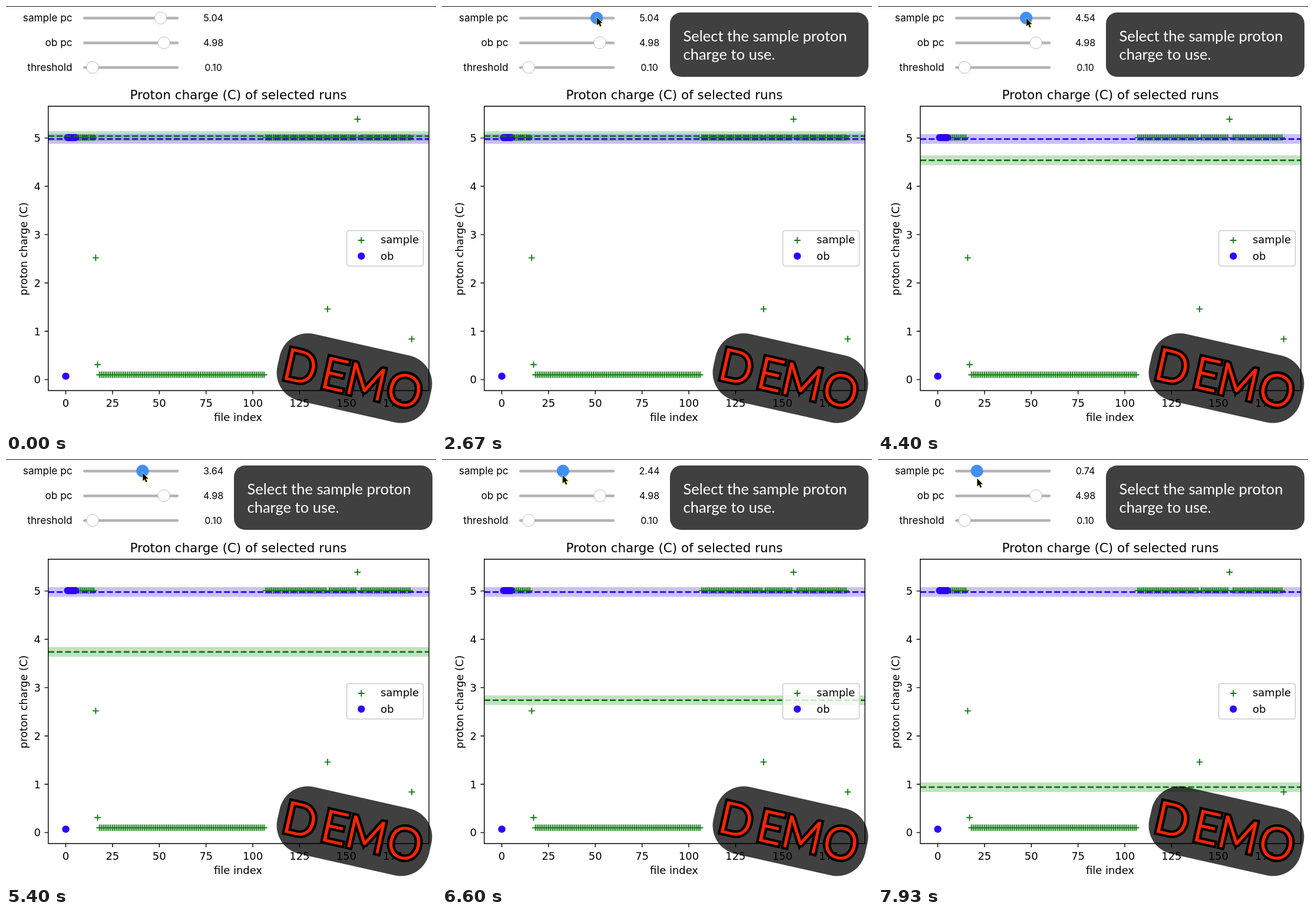
These frames come from a looping animation (730x720 px, 8000 ms). An HTML page:

```html
<!DOCTYPE html>
<html lang="en">
<head>
<meta charset="utf-8">
<title>Proton charge selection</title>
<style>
  html, body { margin: 0; width: 100%; height: 100%; overflow: hidden; background: #fff; }
  svg { display: block; }
  .ui { font: 16px Inter, "Liberation Sans", sans-serif; }
  .label { font-size: 17.2px; text-anchor: end; }
  .plot { font: 17.9px "DejaVu Sans", sans-serif; }
  .note { font: 25.5px Lato, sans-serif; fill: #fff; }
  .demo { font: 300 75px Lato, sans-serif; text-anchor: middle; }
  .mid { text-anchor: middle; }
  .end { text-anchor: end; }
  .plus { fill: none; stroke: #147a14; stroke-width: 1.9; }
  .dash { fill: none; stroke-width: 2.7; stroke-dasharray: 9.9 4.3; }
  .axis { fill: none; stroke: #000; stroke-width: 1.4; }
</style>
</head>
<body>
<svg width="730" height="720" viewBox="0 0 730 720">
  <rect width="730" height="1" fill="#111"/>
  <g id="sliders" class="ui"></g>

  <g class="plot">
    <rect id="obBand" x="72" width="646" height="16.4" fill="#2a00ff" opacity=".25"/>
    <rect id="band" x="72" width="646" height="16.4" fill="#008000" opacity=".24"/>
    <path id="samples" class="plus"/>
    <g id="obs" fill="#2f00ff"></g>
    <path id="line" class="dash" stroke="#0a760a"/>
    <path id="obLine" class="dash" stroke="#2a00f0"/>
    <path id="axes" class="axis"/>
    <g id="ticks"></g>
    <text class="mid" x="394.5" y="158" font-size="21.5">Proton charge (C) of selected runs</text>
    <text class="mid" x="394" y="703">file index</text>
    <text class="mid" transform="translate(35.5 411.5) rotate(-90)">proton charge (C)</text>
    <rect x="578.5" y="380.5" width="130" height="60" rx="4" fill="#fff" fill-opacity=".8" stroke="#ccc" stroke-width="1.6"/>
    <path class="plus" d="M597.8 397h10.8m-5.4-5.4v10.8"/>
    <circle cx="603.2" cy="423.7" r="6.2" fill="#2f00ff"/>
    <text x="636" y="402">sample</text>
    <text x="636" y="429.5">ob</text>
  </g>

  <g transform="translate(591.5 630.5) rotate(12.7)">
    <rect x="-132" y="-58" width="264" height="116" rx="49" fill-opacity=".75"/>
    <g class="demo" stroke="#000" stroke-width="10">
      <g id="letters">
        <text x="-94" y="27.5">D</text><text x="-34" y="27.5">E</text>
        <text x="21" y="27.5">M</text><text x="88" y="27.5">O</text>
      </g>
    </g>
    <use href="#letters" class="demo" fill="#ff2600" stroke="#ff2600" stroke-width="1.6"/>
  </g>

  <g id="note" class="note">
    <rect x="387" y="11" width="337" height="109" rx="19" fill="#404040"/>
    <text x="409.5" y="59.5">Select the sample proton</text>
    <text x="409.5" y="91">charge to use.</text>
  </g>

  <path id="cursor" d="M0 0V13l3-2.8 2.2 5 2.2-.9-2.2-5H9.2z" stroke="#e4ec5a" stroke-width="1.4" paint-order="stroke"/>
</svg>
<script>
const $ = id => document.getElementById(id);
const add = (parent, tag, attrs, text = '') => {
  const el = document.createElementNS('http://www.w3.org/2000/svg', tag);
  for (const k in attrs) el.setAttribute(k, attrs[k]);
  el.textContent = text;
  return parent.appendChild(el);
};
const px = i => 101.5 + 3.175 * i;
const py = v => 632.9 - 81.85 * v;
const knobX = v => 151.7 + 22 * v;

// Sliders
function slider(label, y, x, value) {
  const g = $('sliders');
  add(g, 'text', { class: 'label', x: 112.5, y: y + 6 }, label);
  add(g, 'rect', { x: 131, y: y - 2, width: 162, height: 4.5, rx: 2, fill: '#b3b3b3' });
  const knob = add(g, 'circle', { cx: x, cy: y, r: 10.2, fill: '#fff', stroke: '#bdbdbd' });
  const out = add(g, 'text', { class: 'mid', x: 352, y: y + 6 }, value);
  return { knob, out };
}
const main = slider('sample pc', 20.3, knobX(5.04), '5.04');
slider('ob pc', 62.3, 268, '4.98');
slider('threshold', 104, 147, '0.10');

// Axes
let axes = 'M71.7 169.7H718V651.5H71.7z';
for (let i = 0; i <= 175; i += 25) {
  axes += `M${px(i)} 651.5v6.3`;
  add($('ticks'), 'text', { class: 'mid', x: px(i), y: 679 }, i);
}
for (let v = 0; v <= 5; v++) {
  axes += `M71.7 ${py(v)}h-6.3`;
  add($('ticks'), 'text', { class: 'end', x: 59, y: py(v) + 6.5 }, v);
}
$('axes').setAttribute('d', axes);

// Data: two flat runs and a few outliers
const outliers = { 16: 2.52, 17: .31, 140: 1.46, 156: 5.39, 157: .05, 185: .84 };
let marks = '';
for (let i = 1; i <= 185; i++) {
  const v = outliers[i] ?? (i > 17 && i < 107 ? .1 : 5.01);
  marks += `M${px(i) - 5.4} ${py(v)}h10.8m-5.4-5.4v10.8`;
}
$('samples').setAttribute('d', marks);
for (let i = 0; i < 6; i++)
  add($('obs'), 'circle', { cx: px(i), cy: py(i ? 5.01 : .07), r: 6.2 });

function setBand(band, line, v) {
  band.setAttribute('y', py(v) - 8.2);
  line.setAttribute('d', `M72 ${py(v)}H718`);
}
setBand($('obBand'), $('obLine'), 4.98);

// Motion
const approach = [ // time, x, y
  [267, 695, 445], [733, 190, 303], [1067, 190, 303], [1500, 142, 150],
  [1933, 190, 44], [2400, 274, 24], [2667, knobX(5.04), 18]
];
const drag = [ // time, slider value, plotted value
  [3733, 5.04, 5.04], [4400, 4.54, 4.54], [5400, 3.64, 3.74], [5533, 3.64, 3.74],
  [6200, 3.04, 3.44], [7067, 1.64, 1.94], [7933, .74, .94]
];
const linear = u => u;
const smooth = u => u * u * (3 - 2 * u);
const clamp = u => Math.min(1, Math.max(0, u));
function along(points, t, ease) {
  const n = Math.max(1, points.findLastIndex(p => p[0] < t) + 1);
  const b = points[Math.min(n, points.length - 1)];
  const a = points[points.indexOf(b) - 1];
  const u = ease(clamp((t - a[0]) / (b[0] - a[0])));
  return a.map((v, i) => v + (b[i] - v) * u).slice(1);
}
const snap = v => Math.round((v - .04) * 10) / 10 + .04;

function draw(now) {
  // 15 pictures per second
  const t = Math.floor((now % 8000 + 7) * .015) / .015;
  const [value, plotted] = along(drag, t, linear);
  const [x, y] = t < 2700 ? along(approach, t, smooth)
    : [knobX(value), 18 + 3.2 * (5.04 - value)];
  const v = snap(value), pressed = t > 2590;
  main.knob.setAttribute('cx', knobX(v));
  main.knob.setAttribute('fill', pressed ? '#428ff4' : '#fff');
  main.knob.setAttribute('stroke', pressed ? '#428ff4' : '#bdbdbd');
  main.out.textContent = v.toFixed(2);
  setBand($('band'), $('line'), snap(plotted));
  $('cursor').setAttribute('transform', `translate(${x + .5} ${y + 1.5})`);
  $('cursor').style.display = t < 266 ? 'none' : '';
  $('note').style.opacity = clamp((t - 1067) / 500);
  requestAnimationFrame(draw);
}
requestAnimationFrame(draw);
</script>
</body>
</html>
```
